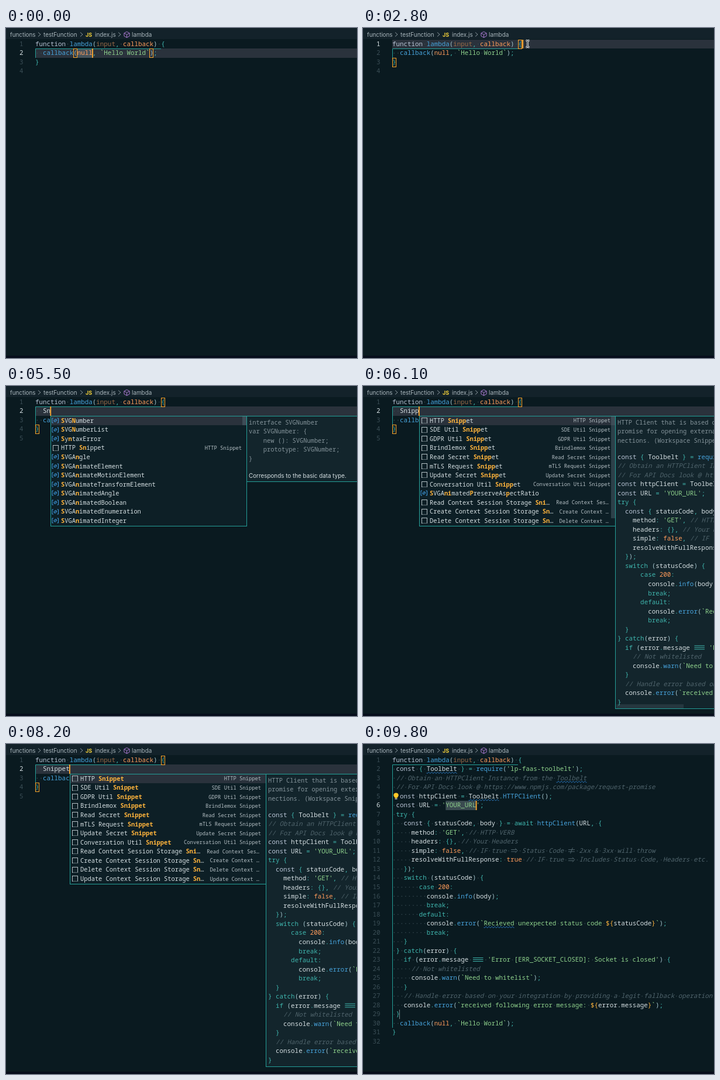
Animation of 600x564 px, one loop 9.9 s. Source, as an HTML page with a canvas:

```html
<!DOCTYPE html>
<html lang="en">
<head>
<meta charset="utf-8">
<title>Snippet completion</title>
<style>
html, body { margin: 0; width: 100%; height: 100%; overflow: hidden; background: #0a1a20; }
canvas { display: block; }
</style>
</head>
<body>
<canvas id="stage" width="600" height="564"></canvas>
<script>
const ctx = document.getElementById('stage').getContext('2d');
const LOOP = 9900;
const MONO = '"Noto Sans Mono", "DejaVu Sans Mono", monospace';
const SANS = 'Inter, Roboto, sans-serif';
const CW = 6.52, ROW = 15.52, LEFT = 50;   // editor cell and text origin
const LW = 6.22;                           // list cell
const C = {
  bg: '#0a1a20', panel: '#0d1f26', info: '#13252c', row: '#2a323c', teal: '#249f98', dot: '#3a4d55',
  text: '#d5dfe2', key: '#b9c5d6', ctrl: '#3fb5ad', fn: '#47a3dc', str: '#8fd28c',
  num: '#ff9c5b', note: '#50646c', paren: '#a4c4cc', gold: '#ffb43c', dim: '#84939a',
  caret: '#ffa92e', blue: '#3f9be0'
};

const HEAD = 'function lambda(input, callback) {';
const CALL = '  callback(null, `Hello World`);';
const SNIPPET = [
  "const { Toolbelt } = require('lp-faas-toolbelt');",
  '// Obtain an HTTPClient Instance from the Toolbelt',
  '// For API Docs look @ https://www.npmjs.com/package/request-promise',
  'const httpClient = Toolbelt.HTTPClient();',
  "const URL = 'YOUR_URL';",
  'try {',
  '  const { statusCode, body } = await httpClient(URL, {',
  "    method: 'GET', // HTTP VERB",
  '    headers: {}, // Your Headers',
  '    simple: false, // IF true => Status Code != 2xx & 3xx will throw',
  '    resolveWithFullResponse: true // IF true => Includes Status Code, Headers etc.',
  '  });',
  '  switch (statusCode) {',
  '      case 200:',
  '        console.info(body);',
  '        break;',
  '      default:',
  '        console.error(`Recieved unexpected status code ${statusCode}`);',
  '        break;',
  '  }',
  '} catch(error) {',
  "  if (error.message === 'Error [ERR_SOCKET_CLOSED]: Socket is closed') {",
  '    // Not whitelisted',
  '    console.warn(`Need to whitelist`);',
  '  }',
  '  // Handle error based on your integration by providing a legit fallback operation',
  '  console.error(`received following error message: ${error.message}`);',
  '}'
];
const SVG_LIST = ['SVGNumber', 'SVGNumberList', 'SyntaxError', 'HTTP Snippet', 'SVGAngle',
  'SVGAnimateElement', 'SVGAnimateMotionElement', 'SVGAnimateTransformElement',
  'SVGAnimatedAngle', 'SVGAnimatedBoolean', 'SVGAnimatedEnumeration', 'SVGAnimatedInteger'];
const UTILS = ['HTTP', 'SDE Util', 'GDPR Util', 'Brindlemox', 'Read Secret', 'mTLS Request',
  'Update Secret', 'Conversation Util'].map(s => s + ' Snippet');
const storage = (verb, cut) => `${verb} Context Session Storage ${cut}…`;
const STORES = [storage('Read', 'Sni'), storage('Create', 'Sn'), storage('Delete', 'Sn')];
const MID_LIST = [...UTILS, 'SVGAnimatedPreserveAspectRatio', ...STORES];
const FULL_LIST = [...UTILS, ...STORES, storage('Update', 'Sn')];

// Time at which each further letter of the word is in place
const KEYS = [4800, 5200, 5700, 5900, 6100, 6400, 6700];
const CLICK = 2300, ENTER = 3500, SETTLE = 7400, ACCEPT = 8800;

const colX = c => LEFT + c * CW;
const rowY = n => 27 + (n - 1) * ROW;
const rowTop = n => Math.round(rowY(n) - 7.3);
const rowHeight = n => rowTop(n + 1) - rowTop(n);

function rect(x, y, w, h, color) { ctx.fillStyle = color; ctx.fillRect(x, y, w, h); }
function frame(x, y, w, h, color) {
  ctx.strokeStyle = color; ctx.lineWidth = 1;
  ctx.strokeRect(Math.round(x) + .5, Math.round(y) + .5, Math.round(w), Math.round(h));
}
function path(points, color, width = 1, close = false) {
  ctx.strokeStyle = color; ctx.lineWidth = width;
  ctx.beginPath();
  points.forEach(([x, y]) => ctx.lineTo(x, y));
  if (close) ctx.closePath();
  ctx.stroke();
}
function text(s, x, y, font, color, align = 'left') {
  ctx.font = font; ctx.fillStyle = color; ctx.textAlign = align;
  ctx.fillText(s, x, y + 3.7);
}
const mono = (cell, style = '500') => `${style} ${cell / .6}px ${MONO}`;

const TOKEN = /(\/\/.*)|(`[^`]*`|'[^']*')|\b(const|function)\b|\b(try|switch|case|break|default|await|catch|if)\b|\b(null|true|false|\d+)\b|(\w+)(?=\()|(\w+)|([{}=;:,.!]+)|([()]+)/g;
const TONES = [C.note, C.str, C.key, C.ctrl, C.num, C.fn, C.text, C.ctrl, C.paren];
const JOINED = /===|=>|!=/g;

function joined(sign, x, y, color) {
  const w = sign.length * CW;
  const bars = sign === '===' ? [-3, 0, 3] : [-1.7, 1.7];
  bars.forEach(d => path([[x + 1, y + d], [x + w - (sign === '=>' ? 3 : 1), y + d]], color));
  if (sign === '=>') path([[x + w - 5, y - 4], [x + w - 1, y], [x + w - 5, y + 4]], color);
  if (sign === '!=') path([[x + w / 2 - 2, y + 5], [x + w / 2 + 2, y - 5]], color);
}

function code(line, x, y, dots) {
  if (dots) {
    [...line].forEach((ch, i) => {
      if (ch === ' ') rect(x + i * CW + 2.7, y - .2, 1.3, 1.3, C.dot);
    });
  }
  for (const m of line.matchAll(TOKEN)) {
    const kind = m.slice(1).findIndex(Boolean);
    const at = x + m.index * CW;
    const style = kind === 0 ? 'italic 400' : '500';
    let color = TONES[kind];
    if (line === HEAD && m[0] === 'input') color = '#9a6b48';
    if (line === HEAD && m[0] === 'callback') color = C.num;
    const shown = m[0].replace(JOINED, s => ' '.repeat(s.length));
    const hole = shown.match(/\$\{([^}]*)\}/);
    if (kind === 1 && hole) {
      const parts = [[shown.slice(0, hole.index), color], ['${', C.gold], [hole[1], C.text],
        ['}', C.gold], [shown.slice(hole.index + hole[0].length), color]];
      let n = 0;
      parts.forEach(([s, tone]) => { text(s, at + n * CW, y, mono(CW), tone); n += s.length; });
    } else {
      text(shown, at, y, mono(CW, style), color);
    }
    for (const j of m[0].matchAll(JOINED)) joined(j[0], at + j.index * CW, y, color);
  }
}

function squiggle(col, row, n) {
  const pts = [];
  for (let x = 0; x <= n * CW; x += .5) {
    pts.push([colX(col) + x, rowY(row) + 6.7 + Math.sin(x * 1.25) * 1.1]);
  }
  path(pts, '#2f83d0', 1);
}

function bulb(row) {
  const x = 56.5, y = rowY(row) - 1.5;
  rect(51, rowTop(row) + 1, 12, 14, C.bg);
  ctx.fillStyle = '#ffc928';
  ctx.beginPath(); ctx.arc(x, y, 4.2, 0, 7); ctx.fill();
  rect(x - 2, y + 3, 4, 2, '#ffc928');
  rect(x - 2, y + 5.5, 4, 1.5, '#b9c0c2');
}

const band = row => rect(LEFT, rowTop(row), 550, rowHeight(row), C.row);
const caret = (col, row) => rect(colX(col) - .7, rowTop(row), 1.8, rowHeight(row), C.caret);
const boxed = (col, row) => frame(colX(col) - .3, rowTop(row), 6, 15, C.caret);

function breadcrumb() {
  const font = `9.9px ${SANS}`, tone = '#a8b5bb';
  rect(0, 0, 600, 19, '#13222a');
  text('functions', 7, 11, font, tone);
  text('testFunction', 64, 11, font, tone);
  text('JS', 136, 11.3, `bold 9px ${SANS}`, '#f0cf3a');
  text('index.js', 152, 11, font, tone);
  text('lambda', 215, 11, font, tone);
  [57, 129, 194].forEach(x => path([[x - 2, 7.5], [x + 2, 11], [x - 2, 14.5]], '#8a989e'));
  const x = 206.5, y = 11.3, p = '#a878cf';
  path([[x, y - 5], [x + 4.6, y - 2.5], [x + 4.6, y + 2.5], [x, y + 5],
    [x - 4.6, y + 2.5], [x - 4.6, y - 2.5]], p, 1, true);
  path([[x - 4.6, y - 2.5], [x, y], [x + 4.6, y - 2.5]], p);
  path([[x, y], [x, y + 5]], p);
}

function scope(last) {
  path([[265, 35.5], [50.5, 35.5], [50.5, rowTop(last)]], C.teal);
}

// Indices of the letters of a label that match the query
function hits(label, query) {
  const q = query.toLowerCase(), low = label.toLowerCase();
  const start = label.indexOf('Sn');
  if (start >= 0) {
    const end = Math.min(start + q.length, label.replace('…', '').length);
    return new Set(Array.from({ length: end - start }, (_, i) => start + i));
  }
  const found = new Set();
  let from = 0;
  for (const ch of q) {
    const i = low.indexOf(ch, from);
    if (i < 0) break;
    found.add(i); from = i + 1;
  }
  return found;
}

function icon(x, y, isSnippet) {
  if (isSnippet) {
    frame(x + 4, y - 5, 9, 9, '#b4bfc4');
    for (let i = 6; i < 13; i += 2) rect(x + i, y + 4, 1, 1, C.panel);
    return;
  }
  path([[x + 5, y - 4], [x + 3, y - 4], [x + 3, y + 4], [x + 5, y + 4]], C.blue);
  path([[x + 11.5, y - 4], [x + 13.5, y - 4], [x + 13.5, y + 4], [x + 11.5, y + 4]], C.blue);
  ctx.beginPath(); ctx.ellipse(x + 8.3, y, 2.6, 2, -.6, 0, 7); ctx.stroke();
  path([[x + 6.5, y + 1.5], [x + 10, y - 1.5]], C.blue);
}

function label(s, x, y, query) {
  const marks = hits(s, query);
  [...s].forEach((ch, i) => {
    const on = marks.has(i);
    if (ch !== ' ') text(ch, x + i * LW, y, mono(LW, on ? 'bold' : '500'), on ? C.gold : C.text);
  });
}

function list(x, items, query, bar) {
  const top = 51, step = 15.56;
  rect(x, top, 336, 189, C.panel);
  rect(x, top, 336, 16, C.row);
  items.forEach((s, i) => {
    const y = 59 + i * step, isSnippet = /Sn/.test(s);
    icon(x, Math.round(y), isSnippet);
    label(s, x + 18, y, query);
    if (!isSnippet) return;
    const cut = s.endsWith('…');
    const verb = s.split(' ')[0];
    const note = cut ? verb + (verb === 'Read' ? ' Context Ses…' : ' Context …') : s;
    text(note, x + (cut ? 324 : 327), y - .3, mono(5.28), '#b3bec3', 'right');
  });
  if (bar) rect(x + 328, top + 1, 7, query.length < 3 ? 15 : 174, 'rgba(95,120,128,.38)');
  frame(x, top, 335, 188, C.teal);
}

function prose(lines, x) {
  lines.forEach((s, i) => text(s, x + 4, 62 + i * 15.5, mono(LW), C.dim));
}

function typeInfo(x) {
  rect(x, 51, 600, 113, C.info);
  frame(x, 51, 600, 112, C.teal);
  prose(['interface SVGNumber', 'var SVGNumber: {', '    new (): SVGNumber;',
    '    prototype: SVGNumber;', '}'], x);
  text('Corresponds to the basic data type.', x + 4, 153, `9.85px ${SANS}`, C.text);
}

function snippetInfo(x, bar) {
  rect(x, 51, 600, 501, C.info);
  if (bar) rect(x + 2, 544, 115, 7, '#25373f');
  frame(x, 51, 600, 500, C.teal);
  prose(['HTTP Client that is based on', 'promise for opening external con-',
    'nections. (Workspace Snippet)'], x);
  SNIPPET.forEach((s, i) => code(s, x + 4, 121 + i * ROW, false));
}

function pointer(t) {
  const lerp = (a, b, k) => a + (b - a) * k;
  const k = Math.min(1, (t - 800) / 1400);
  const e = k * k * (3 - 2 * k);
  const x = Math.round(lerp(390, 281, e)) + .5, y = Math.round(lerp(273, 27, e));
  const beam = (c, w) => {
    path([[x, y - 5], [x, y + 5]], c, w);
    path([[x - 3, y - 6], [x - 1, y - 5.5], [x, y - 4.5], [x + 1, y - 5.5], [x + 3, y - 6]], c, w);
    path([[x - 3, y + 6], [x - 1, y + 5.5], [x, y + 4.5], [x + 1, y + 5.5], [x + 3, y + 6]], c, w);
  };
  beam('#e6eaec', 3);
  beam('#0a1014', 1);
}

function editor(lines, active) {
  lines.forEach((s, i) => {
    code(s, LEFT, rowY(i + 1), true);
    text(String(i + 1), 29.5, rowY(i + 1), mono(CW), i + 1 === active ? C.text : '#3b4e56', 'right');
  });
}

function before(t) {
  const row = t >= CLICK ? 1 : 2;
  band(row);
  if (row === 2) rect(colX(11), rowTop(2), 4 * CW, rowHeight(2), '#46535c');
  editor([HEAD, CALL, '}', ''], row);
  scope(3);
  if (row === 1) {
    boxed(33, 1); boxed(0, 3); caret(34.2, 1);
  } else {
    boxed(10, 2); boxed(30, 2); caret(15, 2);
  }
  if (t >= 800) pointer(t);
}

function typing(t) {
  const n = KEYS.filter(k => t >= k).length;
  const word = 'Snippet'.slice(0, n);
  band(2);
  editor([HEAD, '  ' + word, CALL, '}', ''], 2);
  scope(4);
  boxed(33, 1); boxed(0, 4);
  const fresh = t < SETTLE;
  if (t >= 6800 && fresh) { squiggle(2, 2, 7); bulb(1); }
  caret(2 + n, 2);
  if (t < 5000) return;
  const x = Math.round(colX(2 + n) + .3);
  if (n < 3) typeInfo(x + 335);
  else snippetInfo(x + 335, fresh);
  list(x, n < 3 ? SVG_LIST : n < 7 ? MID_LIST : FULL_LIST, word, fresh);
}

function inserted(t) {
  rect(colX(14), rowTop(6), 8 * CW, rowHeight(6), '#3a4b50');
  editor([HEAD, ...SNIPPET.map(s => ' ' + s), CALL, '}', ''], 6);
  scope(31);
  rect(62, rowTop(29), 1, rowHeight(29), '#77868c');
  caret(22, 6);
  if (t < 9400) return;
  squiggle(9, 2, 8);
  squiggle(43, 3, 8);
  squiggle(20, 5, 8);
  squiggle(24, 19, 8);
  bulb(5);
}

function draw(now) {
  const t = Math.floor(now % LOOP / 100) * 100;
  rect(0, 0, 600, 564, C.bg);
  breadcrumb();
  if (t < ENTER) before(t);
  else if (t < ACCEPT) typing(t);
  else inserted(t);
  rect(0, 560, 600, 4, '#060d1b');
}

let start;
function tick(now) {
  if (start === undefined) start = now;
  draw(now - start);
  requestAnimationFrame(tick);
}
draw(0);
requestAnimationFrame(tick);
</script>
</body>
</html>
```
